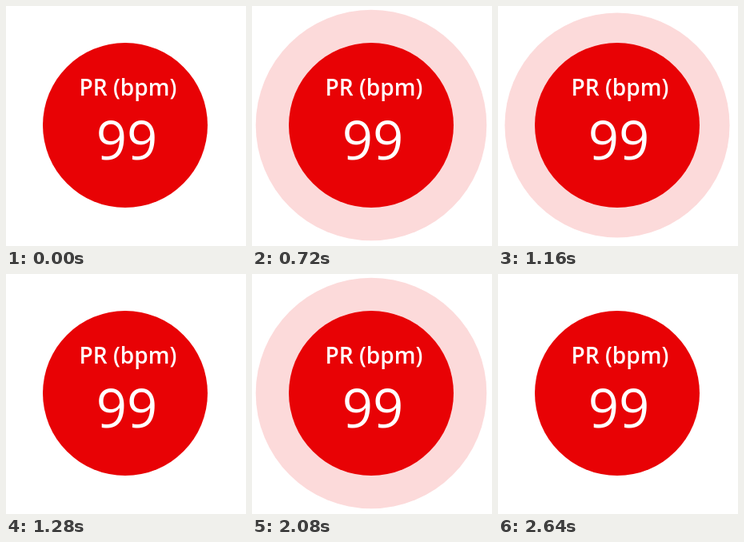
An HTML page that plays this animation: 300 by 300 pixels, repeating every 2960 ms.

```html
<!DOCTYPE html>
<html lang="en">
<head>
<meta charset="utf-8">
<title>Pulse rate</title>
<style>
  html, body { margin: 0; width: 100%; height: 100%; overflow: hidden; background: #fff; }
  svg { display: block; width: 100vw; height: 100vh; }
  text { fill: #fff; font-family: "Open Sans", "Noto Sans", sans-serif; text-anchor: middle; }
  .label { font-size: 28px; font-weight: 600; }
  .value { font-size: 67px; }
</style>
</head>
<body>
<svg viewBox="0 0 300 300">
  <circle id="halo" cx="149" cy="149" r="103" fill="#fcdada"/>
  <circle cx="149" cy="149" r="103" fill="#e80205"/>
  <text class="label" x="152.4" y="112">PR (bpm)</text>
  <text class="value" x="151" y="192">99</text>
</svg>
<script>
  const LOOP = 2960, STEP = 40, HALF_BEAT = 360;
  const PEAKS = [920, 2280];
  const REST = 102, FULL = 149;
  const halo = document.getElementById("halo");

  // Fast swell, soft plateau, mirrored fall around each peak.
  function haloRadius(time) {
    const distance = Math.min(...PEAKS.map(peak => Math.abs(time - peak)));
    const v = Math.min(1, distance / HALF_BEAT);
    return FULL - (FULL - REST) * (0.57 * v ** 3 + 0.43 * v ** 9);
  }

  function draw() {
    const time = performance.now() % LOOP;
    halo.setAttribute("r", haloRadius(Math.floor(time / STEP) * STEP));
    requestAnimationFrame(draw);
  }
  draw();
</script>
</body>
</html>
```
